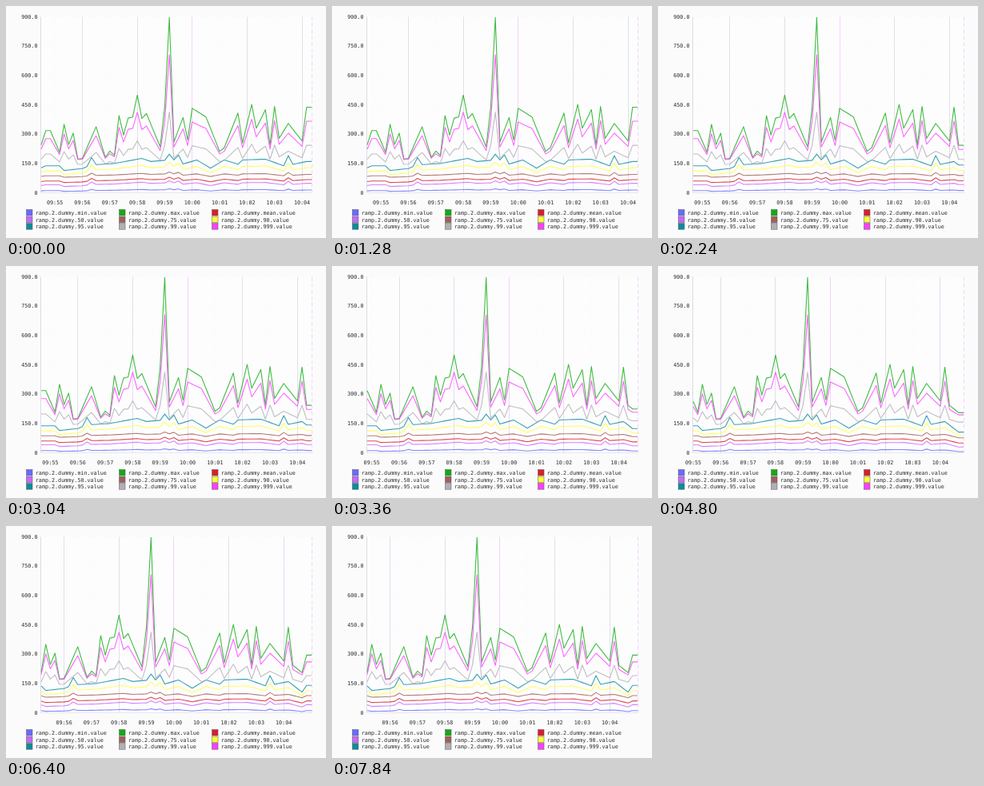
These frames come from a looping animation (400 px wide and 290 px high, 8 s). An HTML page:

```html
<!DOCTYPE html>
<html lang="en">
<head>
<meta charset="utf-8">
<title>Latency chart</title>
<style>
html, body { margin: 0; width: 100%; height: 100%; overflow: hidden; background: #fbfbfc; }
svg { display: block; width: 400px; height: 290px; }
text { font: 6.73px "DejaVu Sans Mono", monospace; fill: #2c2c2c; text-rendering: geometricPrecision; }
polyline { fill: none; stroke-width: 1.1; stroke-opacity: 0.8; stroke-linejoin: round; }
</style>
</head>
<body>
<svg id="chart" viewBox="0 0 400 290"></svg>
<script>
const LOOP = 8000, TICK = 1600, COUNT = 59;
const X0 = 44, STEP = 5.72, LEFT = 43.5, RIGHT = 382.5, TOP = 13.5, BASE = 233.5;
const yOf = v => BASE - v * (BASE - TOP) / 900;

// Joins the turning points [index, value, ...] with straight runs.
function spread(...turns) {
  const out = [];
  for (let k = 0; k + 3 < turns.length; k += 2) {
    const [a, va, b, vb] = turns.slice(k, k + 4);
    for (let i = a; i <= b; i++) out[i] = va + (vb - va) * (i - a) / (b - a);
  }
  return out;
}

// Two curves set the load: its extremes and its ordinary level.
const peak = spread(
  0, 245, 1, 318, 2, 318, 4, 208, 5, 350, 6, 247, 7, 305, 8, 173, 9, 176, 12, 338,
  14, 182, 15, 213, 16, 192, 17, 395, 18, 295, 19, 382, 20, 388, 21, 500, 22, 380,
  23, 405, 26, 235, 27, 440, 28, 897, 29, 260, 31, 385, 32, 270, 33, 432, 36, 388,
  39, 212, 40, 230, 43, 408, 44, 255, 46, 452, 47, 330, 49, 425, 50, 245, 51, 442,
  52, 278, 54, 355, 57, 265, 58, 438, 59, 243, 61, 205, 62, 295);
const level = spread(
  0, 128, 1, 138, 4, 138, 5, 114, 9, 124, 10, 134, 11, 180, 12, 144, 16, 150,
  22, 176, 24, 160, 27, 166, 28, 198, 29, 168, 30, 193, 31, 147, 34, 168, 37, 126,
  40, 168, 43, 146, 44, 168, 49, 172, 53, 138, 54, 190, 55, 145, 58, 160, 61, 106, 62, 140);

const scale = (data, gain, offset) => data.map(v => gain * v + offset);
const around = (mid, gain) => scale(level, gain, mid - gain * 150);

const series = [
  ["min", "#6a6aff", around(13, 0.15)],
  ["max", "#12ac12", peak],
  ["mean", "#d8202a", around(64, 0.32)],
  ["50", "#c868ff", around(45, 0.35)],
  ["75", "#a06058", around(91, 0.32)],
  ["90", "#ffff3c", around(121, 0.75)],
  ["95", "#0c8c9c", level],
  ["99", "#b0b0b6", scale(peak, 0.37, 81)],
  ["999", "#ff40ff", scale(peak, 0.74, 42)]];

const chart = document.getElementById("chart");
function add(tag, attrs, text = "") {
  const el = document.createElementNS("http://www.w3.org/2000/svg", tag);
  for (const key in attrs) el.setAttribute(key, attrs[key]);
  el.textContent = text;
  return chart.appendChild(el);
}
const line = (x1, y1, x2, y2, stroke, dash = "none") =>
  add("line", { x1, y1, x2, y2, stroke, "stroke-dasharray": dash });

add("rect", { x: 43, y: 13, width: 340, height: 221, fill: "#fdfdfe" });
for (let v = 0; v <= 900; v += 150) {
  const y = Math.round(yOf(v)) - 0.5;
  line(LEFT, y, RIGHT, y, v ? "#f6f2f6" : "#e8e6ea", v ? "1 3" : "none");
  add("text", { x: 39.5, y: y + 2.2, "text-anchor": "end" }, v ? v.toFixed(1) : "0");
}
line(LEFT, TOP, LEFT, BASE, "#dedae4");
line(RIGHT, TOP, RIGHT, BASE, "#f4d4f4", "5 3");

// Even minutes get a clear line, the full hour a pink one.
function gridStyle(minute) {
  if (minute === 60) return ["#f4d2f4", "none"];
  return minute % 2 ? ["#f6f2f6", "1 3"] : ["#e2deea", "none"];
}

const minutes = [];
for (let minute = 55; minute < 65; minute++) {
  const hour = minute < 60 ? "09" : "10";
  const label = `${hour}:${String(minute % 60).padStart(2, "0")}`;
  minutes.push({
    index: 3 + 6 * (minute - 55),
    grid: line(0, TOP, 0, BASE, ...gridStyle(minute)),
    text: add("text", { y: 247.7, "text-anchor": "middle" }, label)
  });
}

const plots = series.map(([, stroke, data]) => ({ data, el: add("polyline", { stroke }) }));

series.forEach(([name, fill], k) => {
  const x = 25.5 + (k % 3) * 116, y = 254.5 + Math.floor(k / 3) * 8.6;
  add("rect", { x, y, width: 7.5, height: 7.5, fill, stroke: "#555", "stroke-width": 0.5 });
  add("text", { x: x + 11.3, y: y + 6.4 }, `ramp.2.dummy.${name}.value`);
});

let shown = -1;
function draw(shift) {
  if (shift === shown) return;
  shown = shift;
  for (const { index, grid, text } of minutes) {
    const x = X0 + STEP * (index - shift);
    const gx = Math.floor(x) + 0.5;
    grid.setAttribute("x1", gx);
    grid.setAttribute("x2", gx);
    grid.style.display = text.style.display = x < 43 ? "none" : "";
    text.setAttribute("x", x);
  }
  for (const { data, el } of plots) {
    const pts = data.slice(shift, shift + COUNT)
      .map((v, i) => `${(X0 + STEP * i).toFixed(2)},${yOf(v).toFixed(2)}`);
    // The newest value is held up to the right edge.
    pts.push(`382,${yOf(data[shift + COUNT - 1]).toFixed(2)}`);
    el.setAttribute("points", pts.join(" "));
  }
}

function frame() {
  draw(Math.floor(performance.now() % LOOP / TICK));
  requestAnimationFrame(frame);
}
frame();
</script>
</body>
</html>
```
